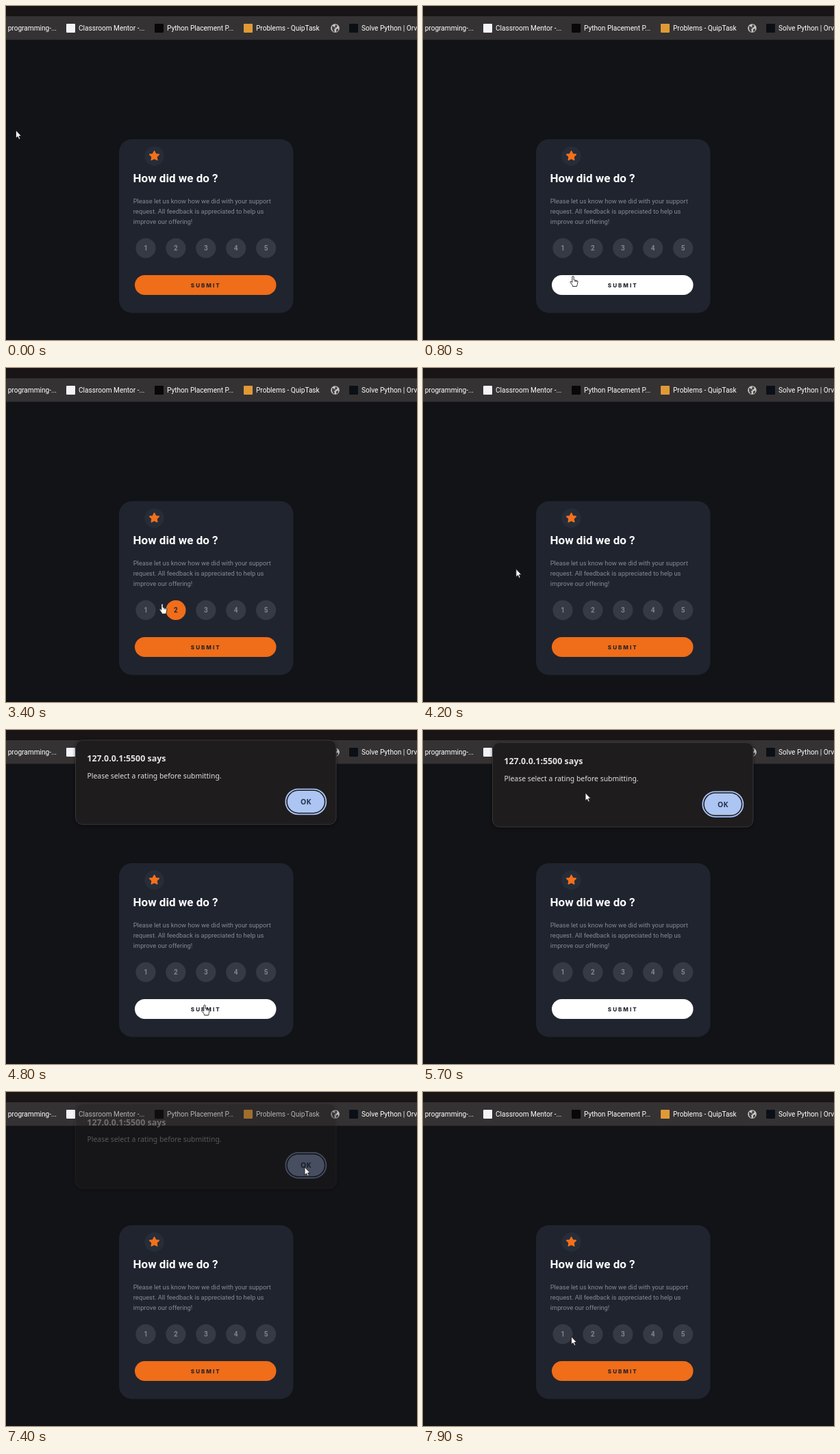
Write an HTML page that moves like this. It is 600 by 489 pixels and loops after 8000 ms.

```html
<!DOCTYPE html>
<html lang="en">
<head>
<meta charset="utf-8">
<title>Rating card</title>
<style>
  html, body { margin: 0; width: 100%; height: 100%; overflow: hidden; background: #121317; }
  svg { display: block; }
  text { white-space: pre; }
  .bar { font: 400 10.1px Roboto, sans-serif; fill: #fff; }
  .title { font: 700 17px Roboto, sans-serif; fill: #fff; }
  .copy { font: 400 9.34px Roboto, sans-serif; fill: #858a93; }
  .num { font: 700 10px Roboto, sans-serif; text-anchor: middle; fill: #7f858e; }
  .rate circle { fill: #353a45; }
  .rate.on circle { fill: #f06d19; }
  .rate.on .num { fill: #252a33; }
  .submit rect { fill: #f06d19; }
  .submit.on rect { fill: #fff; }
  .submit text { font: 800 8px Inter, sans-serif; letter-spacing: 2.05px; fill: #23242c; }
  .alert > rect:first-child { filter: drop-shadow(0 1px 2px rgba(0, 0, 0, .5)); }
  .alert .head { font: 600 12.4px "Noto Sans", sans-serif; fill: #e6e3e5; }
  .alert .body { font: 400 10.4px "Noto Sans", sans-serif; fill: #e3e0e2; }
  .alert .ok { font: 600 10.4px "Noto Sans", sans-serif; text-anchor: middle; fill: #25344f; }
  .pointer path { fill: #fff; stroke: #1c1c1f; stroke-width: .9; stroke-linejoin: round; }
</style>
</head>
<body>
<svg id="stage" width="600" height="489" viewBox="0 0 600 489"></svg>
<script>
const LOOP = 8000, TICK = 100;
const SPEED = .9; // pointer, px per ms
const ALERT_IN = 4500, ALERT_OUT = 7200;
const SUBMIT = 6;
const button = { x: 188, y: 394, width: 206.5, height: 29 };
const rateX = n => 204 + (n - 1) * 43.9, RATE_Y = 354.5, RATE_R = 14.6;

// Places the pointer reaches: arrival time, x, y
const stops = [
  [0, 14.5, 182], [200, 93, 280], [700, 210, 397], [800, 219, 395.5], [1100, 310, 378],
  [1500, 205, 354], [1700, 268, 300], [1800, 270.5, 350], [2100, 352, 350], [2500, 392, 352],
  [2800, 318, 352], [3100, 292, 352], [3300, 242, 350], [3400, 228, 345], [3500, 31, 222],
  [3900, 23, 215], [4400, 290, 402.5], [5200, 562, 190], [5700, 237, 92], [6000, 217, 85],
  [7000, 416.5, 119], [7200, 436, 110], [7900, 216.5, 358]
];

const stage = document.getElementById("stage");

function add(parent, tag, attrs = {}, text = "") {
  const el = document.createElementNS("http://www.w3.org/2000/svg", tag);
  for (const key in attrs) el.setAttribute(key, attrs[key]);
  if (text) el.textContent = text;
  return parent.appendChild(el);
}
const group = cls => add(stage, "g", { class: cls });
const box = (parent, x, y, width, height, rx, fill, more) =>
  add(parent, "rect", { x, y, width, height, rx, fill, ...more });
const label = (parent, cls, x, y, text, more) => add(parent, "text", { class: cls, x, y, ...more }, text);

function drawBookmarks() {
  const g = group("bookmarks");
  box(g, 0, 0, 600, 15, 0, "#191517");
  box(g, 0, 15, 600, 34.5, 0, "#353234");
  label(g, "bar", 74, 36.2, "programming-...", { "text-anchor": "end" });
  [
    [88, "#f3f4f8", "Classroom Mentor -..."],
    [217, "#080808", "Python Placement P..."],
    [347, "#e09a35", "Problems - QuipTask"],
    [501, "#0b1016", "Solve Python | Orvendale"]
  ].forEach(([x, fill, name]) => {
    box(g, x, 26, 13, 13, 1, fill);
    label(g, "bar", x + 18, 36.2, name);
  });
  add(g, "circle", { cx: 480.5, cy: 32.5, r: 6.3, fill: "#c9c7c8" });
  add(g, "path", { d: "M476 29l4 2 1 2-2 1 1 3-2 1-2-4zM481 27l3 2-2 3-2-1zM482 34l3-1v3l-3 2z", fill: "#454244" });
}

function drawCard() {
  const g = group("card");
  box(g, 165, 195, 254.5, 254.5, 19, "#20242e");
  add(g, "circle", { cx: 216.5, cy: 219.8, r: 14.2, fill: "#262d39" });
  const star = Array.from({ length: 10 }, (_, i) => {
    const a = Math.PI * (i / 5 - .5), r = i % 2 ? 3.6 : 7.1;
    return [216.5 + r * Math.cos(a), 219.6 + r * Math.sin(a)];
  });
  add(g, "polygon", {
    points: star.join(" "), fill: "#f4701c", stroke: "#f4701c",
    "stroke-width": 1.6, "stroke-linejoin": "round"
  });
  label(g, "title", 185.5, 258, "How did we do ?");
  [
    "Please let us know how we did with your support",
    "request. All feedback is appreciated to help us",
    "improve our offering!"
  ].forEach((line, i) => label(g, "copy", 185.7, 288.8 + i * 15.2, line));
}

function drawRating(n) {
  const g = group("rate"), cx = rateX(n);
  add(g, "circle", { cx, cy: RATE_Y, r: RATE_R });
  label(g, "num", cx, 358.2, n);
  return g;
}

function drawSubmit() {
  const g = group("submit");
  add(g, "rect", { ...button, rx: button.height / 2 });
  label(g, "", 269.8, 411.7, "SUBMIT");
  return g;
}

function drawAlert() {
  const g = group("alert");
  box(g, 101.5, 18.5, 380.5, 123.5, 10, "#1f1c1e", { stroke: "#39363a" });
  label(g, "head", 118.3, 50, "127.0.0.1:5500 says");
  label(g, "body", 118.5, 74.7, "Please select a rating before submitting.");
  box(g, 408.3, 90.3, 59, 36.8, 18.4, "none", { stroke: "#a9c5f8", "stroke-width": 1.8 });
  box(g, 410.8, 92.8, 54, 31.8, 15.9, "#adc5f2");
  label(g, "ok", 437.7, 112.6, "OK");
  return g;
}

function drawPointer() {
  const g = group("pointer");
  const arrow = add(g, "path", { d: "M0 0V11.5L2.6 9.2L4.5 13.2L6.3 12.4L4.5 8.5H8Z" });
  const hand = add(g, "path", {
    d: "M-1.2 .8Q0-.8 1.2 .8V5.5L5.8 6.6Q7.2 7 7 8.6L6.3 12L5.5 15H-.5L-1 13L-4 9Q-4.4 7.5-2.8 7.8L-1.2 9.2ZM3 6V8.5M5 6.5V8.7"
  });
  return { g, arrow, hand };
}

drawBookmarks();
drawCard();
const targets = [1, 2, 3, 4, 5].map(drawRating);
targets.push(drawSubmit());
const alertBox = drawAlert();
const pointer = drawPointer();

const ramp = (t, from, to) => Math.min(1, Math.max(0, (t - from) / (to - from)));
const smooth = k => k * k * (3 - 2 * k);

// The pointer waits at each stop, then leaves just in time for the next
function pointerAt(t) {
  const next = stops.findIndex(([arrive]) => arrive > t);
  if (next < 1) return stops[next < 0 ? stops.length - 1 : 0].slice(1);
  const [left, x0, y0] = stops[next - 1], [arrive, x1, y1] = stops[next];
  const travel = Math.hypot(x1 - x0, y1 - y0) / SPEED;
  const k = smooth(ramp(t, Math.max(left, arrive - travel), arrive));
  return [x0 + (x1 - x0) * k, y0 + (y1 - y0) * k];
}

function hit([x, y]) {
  const { x: left, y: top, width, height } = button;
  if (x > left && x < left + width && y > top && y < top + height) return SUBMIT;
  return [1, 2, 3, 4, 5].find(n => Math.hypot(x - rateX(n), y - RATE_Y) < RATE_R) || 0;
}

function render(t) {
  const open = ramp(t, ALERT_IN, ALERT_IN + 300), closed = ramp(t, ALERT_OUT, ALERT_OUT + 300);
  const modal = t > ALERT_IN && t < ALERT_OUT + 200;

  // Hover shows one tick late, and stays put under the dialog
  const hover = modal ? SUBMIT : hit(pointerAt(t - TICK));
  targets.forEach((el, i) => el.classList.toggle("on", i + 1 === hover));

  const drop = -3.7 * (1 - ramp(t, ALERT_IN + 300, ALERT_IN + 500)) - 2 * closed;
  alertBox.setAttribute("opacity", open * (1 - closed));
  alertBox.setAttribute("transform", `translate(0 ${drop})`);

  const place = pointerAt(t);
  const isHand = hover > 0 && (!modal || hit(place) === SUBMIT);
  pointer.hand.style.display = isHand ? "" : "none";
  pointer.arrow.style.display = isHand ? "none" : "";
  pointer.g.setAttribute("transform", `translate(${place})`);
}

// The screen updates ten times a second
const start = performance.now();
function loop() {
  const t = (performance.now() - start) % LOOP;
  render(Math.floor(t / TICK) * TICK);
  requestAnimationFrame(loop);
}
loop();
</script>
</body>
</html>
```
